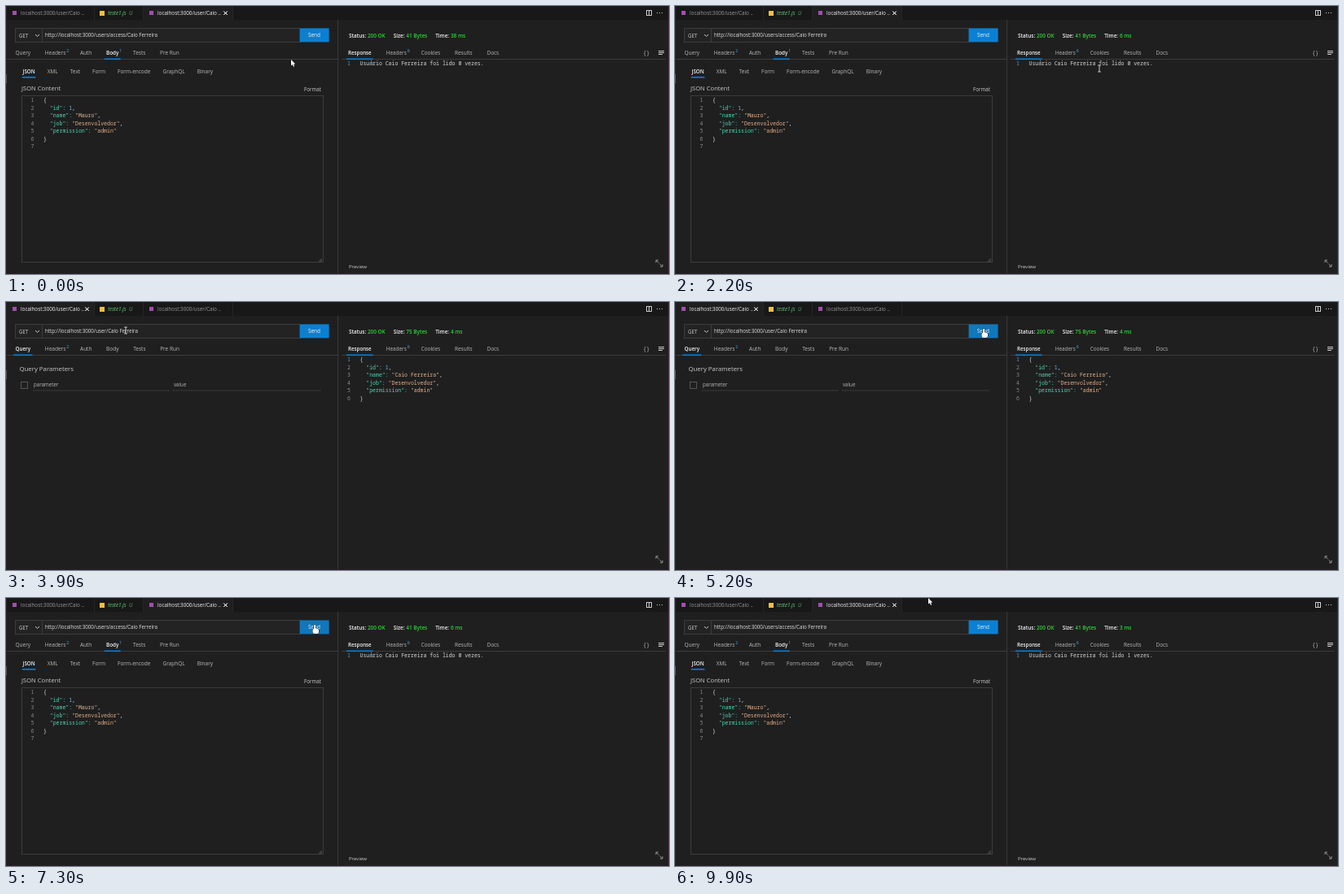
An HTML page with a canvas that plays this animation: 814x330 px, repeating every 10 s.

```html
<!DOCTYPE html>
<html lang="pt">
<head>
<meta charset="utf-8">
<title>API client</title>
<style>
html, body { margin: 0; width: 814px; height: 330px; overflow: hidden; background: #1f1f1f; }
canvas { display: block; }
</style>
</head>
<body>
<canvas id="stage" width="814" height="330"></canvas>
<script>
const c = document.getElementById('stage').getContext('2d');
const UI = '"Open Sans", "Noto Sans", sans-serif';
const MONO = '"Noto Sans Mono", "DejaVu Sans Mono", monospace';
const NAME = 'Caio Ferreira', HOST = 'localhost:3000/user';
const BG = '#1f1f1f', WHITE = '#f5f5f5', LIGHT = '#cccccc', DIM = '#999999';
const LINE = '#3c3c3c', BLUE = '#0a7fd4', GREEN = '#2fd53a';

// Pointer moves: start, end, target; it rests in between
const HOME = [350, 66], SEND = [379, 33];
const MOVES = [
  [0, 1100, SEND], [1400, 1900, [600, 73]], [1900, 2200, [521, 77]], [2200, 2600, [60, 8]],
  [3000, 3900, [147, 35]], [3900, 4600, SEND], [5500, 6500, [222, 8]], [6600, 7100, SEND],
  [7600, 8100, [546, 69]], [8100, 8700, [562, 77]], [8700, 9900, [311, 0]]
];

function pointerAt(t) {
  let [x, y] = HOME;
  for (const [start, end, [tx, ty]] of MOVES) {
    const u = Math.min(1, Math.max(0, (t - start) / (end - start)));
    const e = u * u * (3 - 2 * u);
    x += (tx - x) * e;
    y += (ty - y) * e;
  }
  return [x, y];
}

// Draws text centred on y and returns where it ends
function text(s, x, y, color = LIGHT, size = 6.4, style = '', font = UI) {
  c.font = `${style} ${size}px ${font}`;
  c.fillStyle = color;
  c.fillText(s, x, y + size * 0.36);
  return x + c.measureText(s).width;
}

function rect(x, y, w, h, color) {
  c.fillStyle = color;
  c.fillRect(x, y, w, h);
}

function box(x, y, w, h, color = LINE) {
  c.strokeStyle = color;
  c.lineWidth = 1;
  c.strokeRect(x + .5, y + .5, w - 1, h - 1);
}

function line(x1, y1, x2, y2, color = LIGHT, width = 1) {
  c.strokeStyle = color;
  c.lineWidth = width;
  c.beginPath();
  c.moveTo(x1, y1);
  c.lineTo(x2, y2);
  c.stroke();
}

function dotted(...args) {
  c.setLineDash([1, 1]);
  line(...args);
  c.setLineDash([]);
}

// A row of labels, each "name" or "name^badge", with the active one underlined
function tabs(labels, active, x, y, gap, size, pad, drop) {
  for (const label of labels.split(' | ')) {
    const [name, badge] = label.split('^');
    const on = name === active;
    const end = text(name, x, y, on ? WHITE : '#b9b9b9', on ? size * .97 : size, on ? '600' : '');
    if (badge) text(badge, end + 1, y - 2, '#45aeee', 5.2);
    if (on) rect(x - pad, y + drop, end - x + 2 * pad, 1.6, BLUE);
    x = end + gap;
  }
}

function code(rows, x, y) {
  rows.forEach((row, i) => {
    const cy = y + i * 9.5;
    text(i + 1, x - 15.5, cy, '#8a8a8a', 6.5, '', MONO);
    let px = x;
    for (const part of row.split(/("[^"]*":?|\d+)/)) {
      const color = rows.length < 2 ? '#d8d8d8'
        : part.endsWith('":') ? '#4fd6b4'
        : part[0] === '"' ? '#e6b088'
        : /\d/.test(part) ? '#6abcf0' : '#d8d8d8';
      px = text(part, px, cy, color, 6.5, '', MONO);
    }
  });
}

const json = name => ['{', '  "id": 1,', `  "name": "${name}",`, '  "job": "Desenvolvedor",', '  "permission": "admin"', '}'];

function fileTab(left, right, on, x, y) {
  const hover = y < 17 && x >= left && x < right;
  const color = on ? WHITE : DIM;
  if (on || hover) rect(left, 0, right - left, 17, BG);
  rect(right, 0, 1, 17, '#262626');
  rect(left + 8, 6, 5, 5, '#a04fae');
  text(`${HOST}/${NAME.split(' ')[0]} ..`, left + 18, 8.7, color, 6.3);
  if (on || hover)
    for (const d of [-2, 2]) line(right - 10.5, 6.7, right - 6.5, 10.7, color) || line(right - 8.5 - d, 8.7 + d, right - 8.5 + d, 8.7 - d, color);
}

function tabBar(first, x, y) {
  rect(0, 0, 814, 17, '#181818');
  fileTab(0, 108, first, x, y);
  fileTab(168, 278, !first, x, y);
  rect(168, 0, 1, 17, '#262626');
  rect(115, 6, 6, 6, '#f0c040');
  text('teste1.js', 125, 8.7, '#62d27c', 6.3, 'italic');
  text('U', 151, 8.7, '#4fa866', 6.3, 'italic');
  box(786, 5, 7, 7, LIGHT);
  rect(789, 5, 1, 7, LIGHT);
  for (let i = 0; i < 3; i++) rect(799 + 3 * i, 8, 1, 1, LIGHT);
}

function request(first, sendHover) {
  rect(11, 27, 350, 18, '#232323');
  box(11, 27, 351, 18);
  rect(44, 27, 1, 18, LINE);
  text('GET', 16, 36.3, LIGHT, 6.2);
  for (const d of [-2.5, 2.5]) line(38.5 + d, 35, 38.5, 37.5);
  text(`http://${HOST}${first ? '' : 's/access'}/${NAME}`, 48, 36, '#e2e2e2', 6.2);
  rect(360.6, 27.4, 36, 17, sendHover ? '#1177bb' : '#0a80d2');
  text('Send', 371, 36, WHITE);

  rect(0, 65, 408, 1, LINE);
  tabs(`Query | Headers^2 | Auth | Body${first ? '' : '^1'} | Tests | Pre Run`,
    first ? 'Query' : 'Body', 11.5, 57.3, 17.7, 6.5, 2.3, 7.2);

  if (first) {
    text('Query Parameters', 16.5, 81.7, LIGHT, 7.8);
    box(18, 98, 9, 9, '#555555');
    text('parameter', 34, 102.2, '#b8b8b8', 6.2);
    text('value', 206, 102.2, '#b8b8b8', 6.2);
    dotted(33, 109, 200, 109, '#555555');
    dotted(205, 109, 386, 109, '#555555');
    return;
  }
  tabs('JSON | XML | Text | Form | Form-encode | GraphQL | Binary', 'JSON', 20.5, 81, 15, 6.5, .7, 6);
  text('JSON Content', 19, 101.3, LIGHT, 7.6);
  text('Format', 366, 102.7, LIGHT, 6.2);
  box(19, 110, 371, 206);
  code([...json('Mauro'), ''], 46, 116);
  for (const d of [2, 4]) line(388 - d, 315, 388, 315 - d, '#777777', .7);
}

function response(first, ms, visits) {
  const facts = { Status: '200 OK', Size: first ? '75 Bytes' : '41 Bytes', Time: ms + ' ms' };
  let x = 421;
  for (const [label, value] of Object.entries(facts)) {
    x = text(label + ':', x, 36.5, WHITE, 6.4, '600');
    x = text(value, x + 1.8, 36.5, GREEN, 6.4, '600') + 10;
  }
  rect(412, 65, 398, 1, LINE);
  tabs('Response | Headers^6 | Cookies | Results | Docs', 'Response', 420, 57.3, 18, 6.4, 2, 7.2);
  text('{ }', 783, 57.3, LIGHT, 6.2);
  for (let i = 0; i < 3; i++) line(801, 55.5 + 2 * i, i < 2 ? 808 : 806, 55.5 + 2 * i);

  code(first ? json(NAME) : [`Usuário ${NAME} foi lido ${visits} vezes.`], 434.5, 71);
  if (!first) text('Preview', 421, 320.8, LIGHT, 6.1);
  for (const s of [-1, 1]) {
    const px = 802 + 4 * s, py = 317 + 4 * s;
    for (const [dx, dy] of [[3, 0], [0, 3], [3.5, 3.5]]) line(px, py, px - s * dx, py - s * dy, '#aaaaaa', .8);
  }
}

function outlined(path) {
  c.strokeStyle = '#111111';
  c.lineWidth = 1;
  c.stroke(path);
  c.fillStyle = '#ffffff';
  c.fill(path);
}

function pointer(x, y, kind) {
  if (kind === 'beam') {
    for (const d of [-4, 4]) line(x - 1.8, y + d, x + 1.8, y + d, '#dddddd', .9);
    line(x, y - 4, x, y + 4, '#dddddd', .9);
    return;
  }
  const path = new Path2D();
  if (kind === 'hand') {
    path.roundRect(x - 1, y, 2.2, 8, 1);
    path.roundRect(x - 2.5, y + 4.5, 7.5, 6.5, 2.5);
  } else {
    for (const [dx, dy] of [[0, 0], [0, 7.6], [1.7, 6], [3, 8.8], [4.2, 8.3], [3, 5.6], [5.3, 5.4]])
      path.lineTo(x + dx, y + dy);
    path.closePath();
  }
  outlined(path);
}

function draw(now) {
  const t = Math.floor(now % 10000 / 100) * 100;
  const [x, y] = pointerAt(t);
  const first = t >= 2800 && t < 6600;
  const ms = first ? 4 : t < 1300 ? 38 : t < 7400 ? 6 : 3;
  const over = (l, top, r, bottom) => x >= l && x < r && y >= top && y < bottom;
  const send = over(361, 27, 397, 45);
  const hand = send || over(0, 0, 278, 17);
  const beam = over(45, 28, 361, 45) || over(432, 66, 810, 310) || (!first && over(20, 111, 389, 316));

  rect(0, 0, 814, 330, BG);
  tabBar(first, x, y);
  request(first, send);
  response(first, ms, t < 7400 ? 0 : 1);
  rect(407, 17, 1, 313, '#383838');
  rect(0, 0, 1, 330, '#2a2028');
  rect(0, 84, 1, 11, '#555555');
  rect(0, 329, 814, 1, '#2a1c26');
  dotted(813.5, 0, 813.5, 330, '#6b3048');
  pointer(x, y, hand ? 'hand' : beam ? 'beam' : 'arrow');
}

const start = performance.now();
function tick() {
  draw(performance.now() - start);
  requestAnimationFrame(tick);
}
tick();
</script>
</body>
</html>
```
